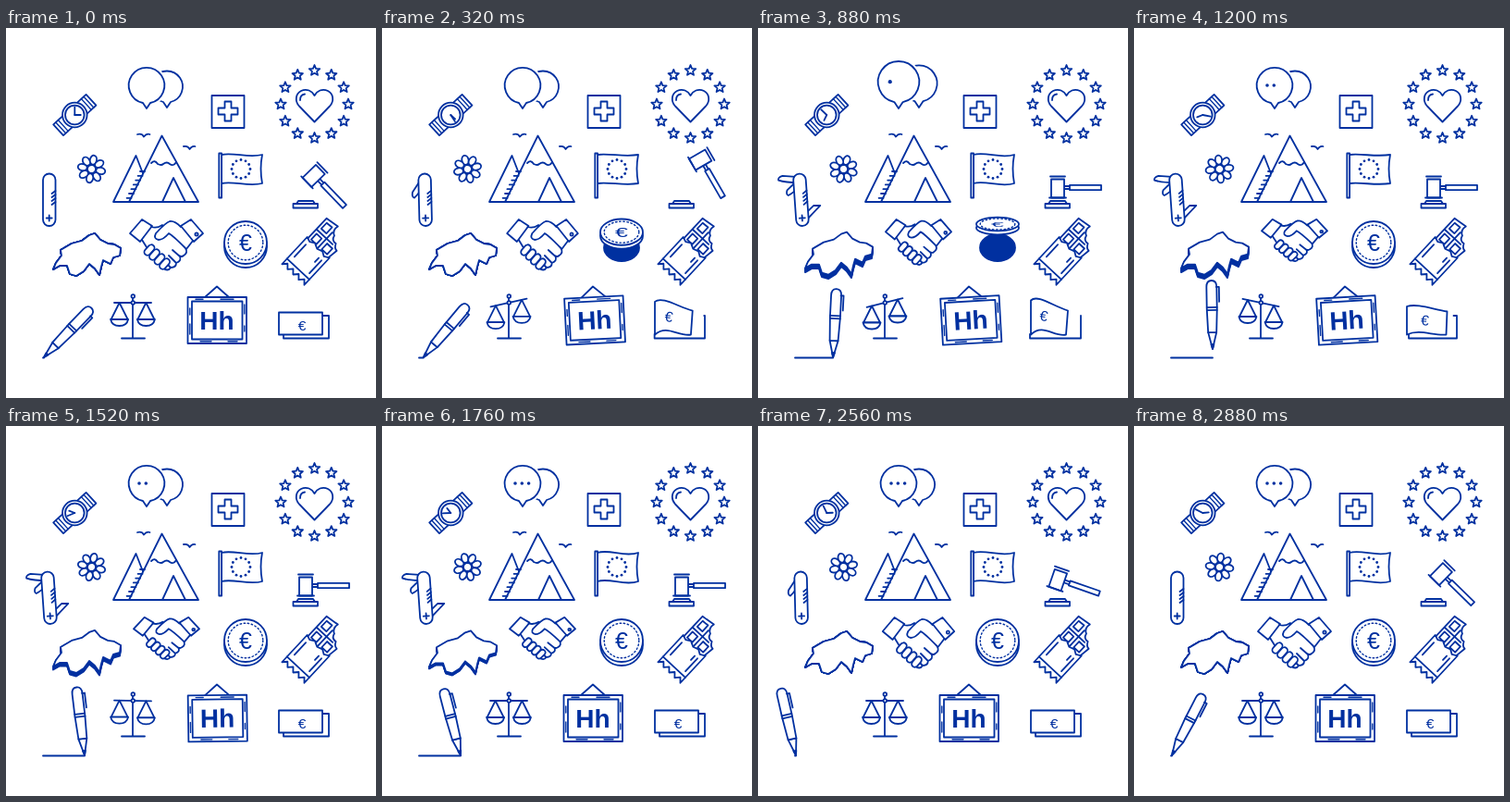
Animation, 400 px wide and 400 px high, one loop 2960 ms. Source, as an HTML page:

```html
<!DOCTYPE html>
<html lang="en">
<head>
<meta charset="utf-8">
<title>Line icons</title>
<style>
html, body { margin: 0; height: 100%; overflow: hidden; background: #fff; }
svg { display: block; width: 100vw; height: 100vh; }
path, rect, circle, ellipse { vector-effect: non-scaling-stroke; }
text { font-family: "Liberation Sans", Arial, sans-serif; fill: #0030a0; stroke: none; text-anchor: middle; }
.ink { fill: #0030a0; }
.dot { fill: #0030a0; stroke: none; }
.none { fill: none; }
.fine { stroke-width: 1.4; }
.halo { stroke: #fff; stroke-width: 6; }
</style>
</head>
<body>
<svg viewBox="0 0 400 400" fill="#fff" stroke="#0030a0" stroke-width="1.8" stroke-linejoin="round" stroke-linecap="round">
  <defs>
    <path id="balloon" d="M156 81L152 87L148 81A19.3 19.3 0 1 1 156 81Z"/>
    <g id="pan"><path d="M0 0L-9 18H9Z"/><path d="M-9.5 18H9.5Q8 25 0 25Q-8 25 -9.5 18Z"/></g>
  </defs>

  <!-- watch -->
  <g transform="translate(74.3 94)">
    <g transform="rotate(-42.500)">
      <rect x="-24" y="-8" width="48" height="16"/>
      <path d="M-20.500-8V8M-17-8V8M17-8V8M20.500-8V8" class="fine"/>
    </g>
    <circle r="13.300"/><circle r="10.300"/>
    <path id="hour" d="M0 0V-6.500"/><path id="minute" d="M0 0V-8.500"/>
  </g>
  <g id="flower"></g>

  <!-- speech bubbles -->
  <g id="bubble2"><path d="M178 80L174 86L170 80A17 17 0 1 1 178 80Z"/></g>
  <g id="bubble">
    <use href="#balloon" class="halo"/><use href="#balloon"/>
    <g id="dots" class="dot"></g>
  </g>

  <!-- cross -->
  <rect x="222.500" y="73" width="35" height="35"/>
  <path d="M236.500 79.500H243.500V86.500H250.500V93.500H243.500V100.500H236.500V93.500H229.500V86.500H236.500Z"/>

  <!-- heart and stars -->
  <path d="M333.500 101.500L317 84.500C312 79 313 71 319 68C325 65 331 68 333.500 73C336 68 342 65 348 68C354 71 355 79 350 84.500Z"/>
  <path class="none" d="M318 78Q318 72 323 71.500"/>
  <g id="stars"></g>

  <!-- birds and mountains -->
  <path class="none" d="M142 115Q147 113.500 149 117.500Q152 113.500 155.500 115M192 128Q197 127 198.500 131Q201 127 204.500 128"/>
  <path d="M140.500 138L116 188H160Z"/>
  <path d="M168.500 116.500L133 188H208Z"/>
  <path class="none" d="M157 146Q161 142 164 147Q168 149 170 147Q174 144 177 147Q181 150 184 145"/>
  <path d="M181 162L169 188H194Z"/>
  <path id="steps"/>

  <!-- flag -->
  <path id="cloth"/>
  <rect x="230.300" y="135.500" width="2.800" height="48"/>
  <g id="ring" class="dot"></g>

  <!-- gavel -->
  <path d="M314 190L316 187H332L334 190ZM310.500 190H337V194.500H310.500Z"/>
  <g id="gavel">
    <rect x="-41" y="-1.500" width="9" height="3"/><rect x="-34" y="-2.700" width="34" height="5.400"/>
    <rect x="-54" y="-9" width="14" height="20"/>
    <path d="M-55-12H-39M-56 11H-38"/>
  </g>

  <!-- pocket knife -->
  <g id="knife">
    <path id="blade1" d="M0-3H-18Q-23-1 -22 2Q-14 4 0 3Z"/>
    <path id="blade2" d="M0-3H-15Q-19-1 -18 2Q-11 4 0 3Z"/>
    <path id="blade3" d="M-2-3H17L22 2L-2 3Z"/>
    <rect x="40" y="157.500" width="13.500" height="56.500" rx="6.700"/>
    <path d="M46.700 202.500V208.500M43.700 205.500H49.700"/>
    <path d="M49.500 179L53.500 176M49.500 183L53.500 180M49.500 187L53.500 184M49.500 191L53.500 188"/>
  </g>

  <!-- country -->
  <g id="land"></g>

  <!-- handshake -->
  <g id="hands">
    <path d="M134 222L147 207L158 214L145 231ZM213 222L200 207L189 214L203 231Z"/>
    <circle cx="206" cy="223" r="1.600"/>
    <path class="none" d="M157 215Q163 217 169 213M147 229L152 237M202 230L195 239M189 215Q182 208 177 209Q173 210 162 222Q159 228 165 229Q170 229 176 222Q180 224 194 238Q197 243 192 246Q190 248 187 246M180 240L188 247Q190 252 184 254L176 246M184 254Q184 259 178 259L171 252M178 259Q175 264 169 259"/>
    <g id="fingers"></g>
  </g>

  <!-- coin -->
  <ellipse class="ink" cx="259" cy="237.500" rx="19" ry="14.500"/>
  <g id="under"><circle r="23"/></g>
  <g id="coin">
    <circle r="23"/><circle r="18.800" stroke-dasharray="1.500 2.600" class="fine"/>
    <text y="9" font-size="25">€</text>
  </g>

  <!-- chocolate -->
  <g transform="translate(310.400 266.500) rotate(43)">
    <path d="M-15-36V-69L0-71Q-2-64 4-61Q5-55 11-56Q13-51 17-51L15-36ZM0-62V-38M-15-53H9"/>
    <path d="M-11.500-65.500L-4-66V-57H-11.500ZM-11.500-49.500H-4V-41H-11.500ZM4-49.500H12V-41H4Z"/>
    <path d="M-16.500-40L-11-38L-6-41L0-38L6-40L11-37L16.500-40V0L12.400-4.500L8.200 0L4.100-4.500L0 0L-4.100-4.500L-8.200 0L-12.400-4.500L-16.500 0Z"/>
    <path class="none" d="M-16.500-8H16.500M-12-33V-15M12-32V-13M8-32V-26"/>
  </g>

  <!-- pen -->
  <path id="stroke"/>
  <g id="pen">
    <path d="M-4.500-18L0 0L4.500-18Z"/><path d="M-1.500-5L0 0L1.500-5Z" class="ink"/>
    <path d="M-5.500-43V-67Q-5.500-74 0-74Q5.500-74 5.500-67V-43L4.500-18H-4.500Z"/>
    <path class="none" d="M-5.500-45H5.500M-5.500-42H5.500M5-67H8V-51"/>
  </g>

  <!-- scales -->
  <path d="M137 291V335M125 335.500H150"/>
  <path id="beam"/><circle cx="137.300" cy="290" r="1.800"/><circle cx="137.300" cy="297" r="1.800"/>
  <use id="pan1" href="#pan"/><use id="pan2" href="#pan"/>

  <!-- board -->
  <g id="board">
    <path class="none" d="M215 291L228 279.500L241 291"/>
    <rect x="196.500" y="291" width="63.500" height="50"/><rect x="201" y="295.500" width="54.500" height="41"/>
    <path class="fine" d="M205 293.300H213M232 293.300H246M210 338.800H222M240 338.800H250M198.800 303V310M198.800 320V331M257.800 299V309M257.800 322V328"/>
    <text x="228" y="325.700" font-size="28" font-weight="bold">Hh</text>
  </g>

  <!-- banknote -->
  <path id="back"/>
  <g id="open"><path id="note"/><text id="euro" y="5.500" font-size="15.500">€</text></g>
  <path id="roll" d="M301 333H325V308H309V297Q301 291 295.500 298V328A5 5 0 0 0 301 333Q305 329 302 324Q301 317 309 316V308"/>
</svg>

<script>
const LOOP = 2960, STEP = 80;
const $ = id => document.getElementById(id);
const set = (id, name, value) => $(id).setAttribute(name, value);
const move = (id, x, y, rest = '') => set(id, 'transform', `translate(${x} ${y}) ${rest}`);
const show = (el, on) => el.setAttribute('visibility', on ? 'visible' : 'hidden');
const times = (n, draw) => Array.from({ length: n }, (_, i) => draw(i)).join('');
const polar = (r, deg) => [r * Math.sin(deg * Math.PI / 180), -r * Math.cos(deg * Math.PI / 180)];

const part = (t, a, b) => Math.min(1, Math.max(0, (t - a) / (b - a)));
const ease = (t, a, b) => { const u = part(t, a, b); return u * u * (3 - 2 * u); };
const hump = (t, a, b) => Math.sin(Math.PI * part(t, a, b));
// Rises over a..b, stays, falls over c..d.
const hold = (t, a, b, c, d) => ease(t, a, b) - ease(t, c, d);

function circleOf(n, r, cx, cy, draw) {
  return times(n, i => {
    const [x, y] = polar(r, i * 360 / n);
    return draw(cx + x, cy + y);
  });
}

const star = 'M' + Array.from({ length: 10 }, (_, i) => polar(i % 2 ? 2.7 : 6, i * 36)).join('L') + 'Z';
const border = 'M51 261L54 254L60 246L59 240L71 233L82 230L90 224L96 222L102 229L110 233L117 234L124 238L123 246L116 248L113 255L105 251L103 258L101 267L96 260L90 255L84 263L76 268L69 266L66 257L58 257Z';

$('stars').innerHTML = circleOf(12, 36.5, 333.5, 82.5, (x, y) => `<path transform="translate(${x} ${y})" d="${star}"/>`);
$('ring').innerHTML = circleOf(12, 10, 254, 152.5, (x, y) => `<circle cx="${x}" cy="${y}" r="1.4"/>`);
$('dots').innerHTML = times(3, i => `<circle cx="${144 + i * 7.3}" cy="62" r="1.8"/>`);
$('flower').innerHTML = times(8, i => `<ellipse cy="-10" rx="3.6" ry="5" transform="rotate(${i * 45})"/>`) + '<circle r="4.5"/>';
$('fingers').innerHTML = times(4, i => `<rect x="-3.5" y="-6.5" width="7" height="13" rx="3.5" transform="translate(${155 + i * 5.5} ${240 + i * 5}) rotate(42)"/>`);
$('land').innerHTML = times(6, i => `<path class="${i < 5 ? 'ink' : ''}" d="${border}"/>`);
set('steps', 'd', times(7, i => `M${150 - i * 2.4} ${155 + i * 4.8}h-5`));

function drawWatch(t) {
  const hours = 3 + 0.0044 * Math.min(t, 1840) + 3.9 * ease(t, 1840, 2240) - 0.17 * ease(t, 2320, 2880);
  move('hour', 0, 0, `rotate(${hours * 30})`);
  move('minute', 0, 0, `rotate(${hours * 360})`);
  move('flower', 92.5, 152.5, `rotate(${t / LOOP * 180 - 34})`);
}

function drawBubbles(t) {
  const s = 1 + 0.17 * hump(t, 320, 1200);
  move('bubble', 152, 87, `scale(${s}) translate(-152 -87)`);
  move('bubble2', 174, 86, `scale(${s}) translate(-174 -86)`);
  [...$('dots').children].forEach((dot, i) => show(dot, t >= 480 + i * 560));
}

function drawFlag(t) {
  const w = 1.5 * Math.sin(t / LOOP * Math.PI * 6);
  set('cloth', 'd', `M233 137C246 ${134 + w} 262 ${141 - w} 277 137Q274 152 277 168C262 ${172 - w} 246 ${165 + w} 233 168Z`);
}

function drawGavel(t) {
  const up = hold(t, 0, 640, 2240, LOOP);
  const angle = (46 + 28 * up) * (1 - ease(t, 640, 720)) + 46 * ease(t, 2240, LOOP);
  move('gavel', 366 + 5 * up, 193 - 20.5 * up, `rotate(${angle})`);
}

function drawKnife(t) {
  const top = hold(t, 160, 560, 2320, 2720), low = hold(t, 560, 880, 2240, 2640);
  move('knife', 47, 190, `rotate(${-4 * top}) translate(-47 -190)`);
  move('blade1', 46, 164, `rotate(${-90 + 98 * top})`);
  move('blade2', 46, 167, `rotate(${-90 + 50 * hold(t, 240, 560, 1760, 2160)})`);
  move('blade3', 49, 206, `rotate(${-90 + 50 * low})`);
}

function drawPen(t) {
  const write = ease(t, 160, 1040);
  const x = 41 + 44 * (write - ease(t, 1760, 2320));
  const lean = 44 - 45 * write - 20 * ease(t, 1200, 2100) + 65 * ease(t, 2400, 3120);
  move('pen', x, 356 - 9 * hump(t, 1040, 1360), `rotate(${lean})`);
  set('stroke', 'd', `M40 356.5H${x}`);
}

function drawLand(t) {
  const depth = 4.5 * hold(t, 480, 880, 1200, 2320);
  [...$('land').children].forEach((layer, i) => layer.setAttribute('transform', `translate(0 ${depth * (0.7 - i / 5)})`));
}

function drawHands(t) {
  const sx = 1 - 0.1 * hold(t, 0, 880, 1760, 2880), sy = 1 - 0.17 * hold(t, 480, 1200, 1760, 2240);
  move('hands', 173.5, 206, `scale(${sx} ${sy}) translate(-173.5 -206)`);
}

function drawCoin(t) {
  const flip = hold(t, 80, 520, 880, 1200);
  const y = 232 - 20 * flip, scale = `scale(1 ${1 - 0.68 * flip})`;
  move('coin', 259, y, scale);
  move('under', 259, y + 4, scale);
}

function drawScales(t) {
  const tilt = -14 * ease(t, 0, 400) + 26 * ease(t, 880, 1200) - 12 * ease(t, 1200, 1600);
  const [x, y] = polar(20, 90 + tilt), k = 0.72;
  set('beam', 'd', `M${137 - x} ${297 - y}L${137 + x} ${297 + y}`);
  move('pan1', 137 - x * k, 297 - y * k);
  move('pan2', 137 + x * k, 297 + y * k);
  move('board', 228, 280, `rotate(${-3.2 * hold(t, 0, 400, 1200, 1680)}) translate(-228 -280)`);
}

function drawNote(t) {
  const k = hold(t, 0, 400, 880, 1520), rolled = t >= 400 && t < 760;
  set('note', 'd', `M295 ${307.5 - 13 * k}C${310 - 8 * k} ${307.5 - 20 * k} ${327 - 8 * k} ${307.5 - 7 * k} ${342 - 7 * k} ${307.5 - 2 * k}`
    + `L${342 - 9 * k} 331.5C${327 - 7 * k} ${331.5 + 3 * k} ${310 - 2 * k} ${331.5 - 13 * k} 295 331.5Z`);
  move('euro', 320 - 11 * k, 321 - 10 * k, `rotate(${10 * k})`);
  set('back', 'd', `M${342 + 7 * k} 311H349V335.5H${300 - 6 * k}V331`);
  show($('open'), !rolled);
  show($('roll'), rolled);
}

const scene = [drawWatch, drawBubbles, drawFlag, drawGavel, drawKnife, drawPen, drawLand, drawHands, drawCoin, drawScales, drawNote];
const start = performance.now();

function tick() {
  const t = Math.max(0, performance.now() - start) % LOOP;
  scene.forEach(draw => draw(Math.floor(t / STEP) * STEP));
  requestAnimationFrame(tick);
}
tick();
</script>
</body>
</html>
```
